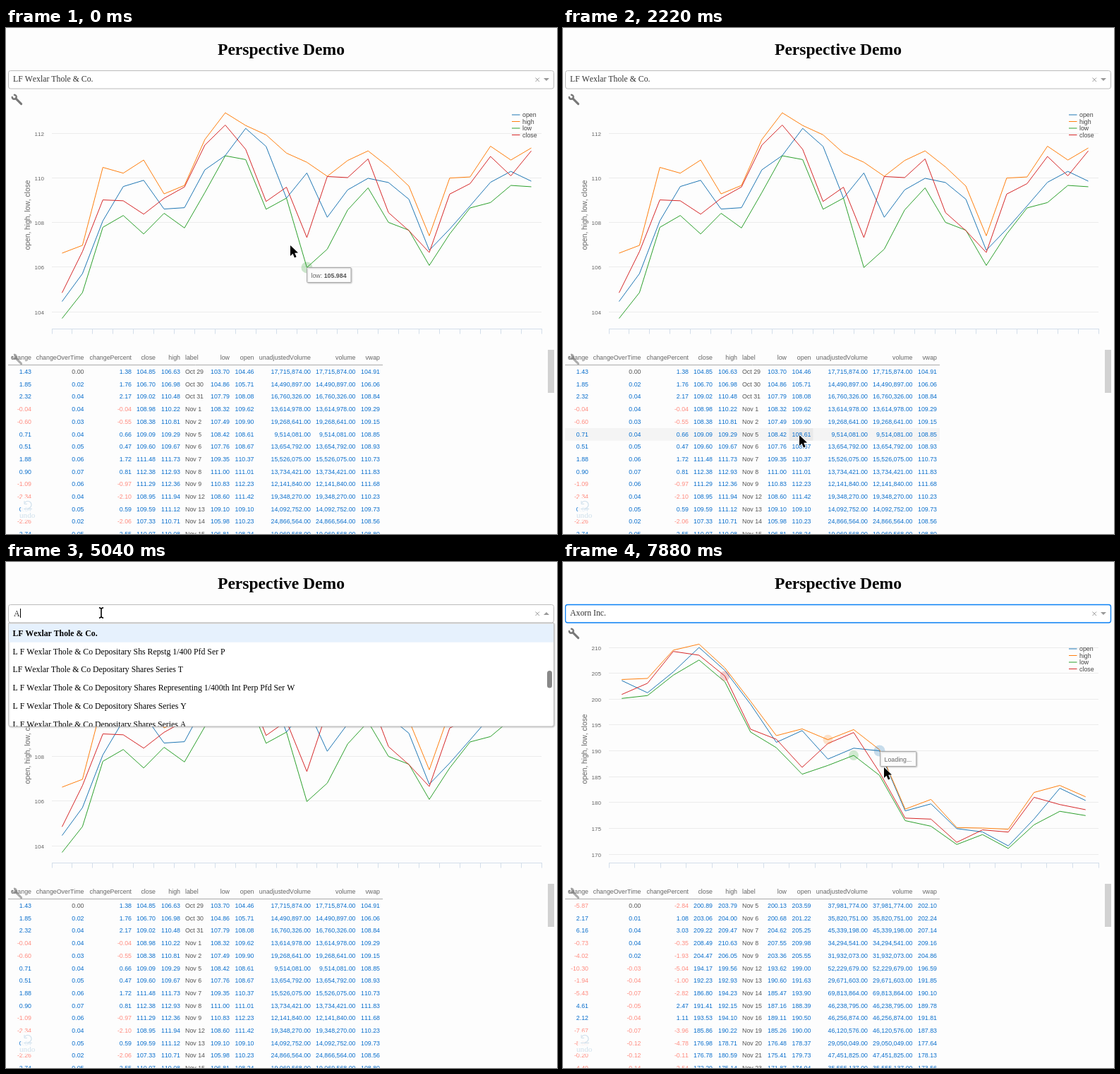
An HTML page with a canvas for the animation above (8000 ms loop, 781 px wide and 717 px high).

```html
<!DOCTYPE html>
<html lang="en">
<head>
<meta charset="utf-8">
<title>Perspective Demo</title>
<style>
  html, body { margin: 0; height: 100%; overflow: hidden; background: #fdfdfd; }
  canvas { display: block; }
</style>
</head>
<body>
<canvas id="stage" width="781" height="717"></canvas>
<script>
const ctx = document.getElementById('stage').getContext('2d');
ctx.fontKerning = 'none';
const LOOP = 8000;
const STEP = 148.6; // the screen repaints once per step; all times below count steps
const LEAD = 15;
const SANS = '"Liberation Sans", Arial, sans-serif';
const SERIF = '"Liberation Serif", Times, serif';
const SERIES = ['open', 'high', 'low', 'close'];
const COLORS = ['#1f77b4', '#ff7f0e', '#2ca02c', '#d62728'];
const [OPEN, HIGH, LOW, CLOSE] = [0, 1, 2, 3];
const AT = { open: 25, scrollbar: 30, type: 33, scroll: 34, filter: 36, blink: 41, choose: 45, reload: 48 };

const noise = i => Math.abs(Math.sin(i * 12.9898) * 43758.5453) % 1;
const list = values => values.trim().split(/\s+/).map(Number);

const bank = {
  name: 'LF Wexlar Thole & Co.', firstDay: 0, previous: 103.42,
  axis: { top: 112, y: 149.5, unit: 31.57, step: 2, count: 5 },
  volume: range => 6050217 + 3981453 * range,
  prices: [
    list(`104.46 105.71 108.08 109.62 109.90 108.61 108.67 110.37 111.01 112.23 111.42 109.10
      110.23 108.24 109.47 109.99 109.80 109.05 106.76 107.71 108.75 109.81 110.30 109.86`),
    list(`106.63 106.98 110.48 110.22 110.81 109.29 109.67 111.73 112.93 112.36 111.94 111.12
      110.71 110.08 110.79 111.22 110.50 109.64 107.41 110 110.05 111.43 110.81 111.35`),
    list(`103.70 104.86 107.79 108.32 107.49 108.42 107.76 109.35 111 110.83 108.60 109.10
      105.984 106.81 108.57 109.56 108.01 107.66 106.08 107.49 108.66 108.90 109.67 109.61`),
    list(`104.85 106.70 109.02 108.98 108.38 109.09 109.60 111.48 112.38 111.29 108.95 109.59
      107.33 110.07 110.02 110.86 108.45 107.64 106.66 109.28 109.75 110.97 110.10 111.22`)
  ]
};

const techOpen = list(`203.59 201.22 205.25 209.98 205.55 199 191.63 193.90 188.39 190.50
  190 178.37 179.73 174.94 174.30 171.60 176.80 182.75 180.38`);
const techClose = list(`200.89 203.06 209.22 208.49 204.47 194.17 192.23 186.80 191.41 193.53
  185.86 176.98 176.78 172.29 174.70 174.27 181 179.60 178.60`);
const tech = {
  name: 'Axorn Inc.', firstDay: 5, previous: 206.76,
  axis: { top: 210, y: 121, unit: 7.325, step: 5, count: 9 },
  volume: range => 15120348 + 6241789 * range,
  prices: [
    techOpen,
    techOpen.map((open, i) => Math.max(open, techClose[i]) + 0.2 + 0.8 * noise(i)),
    techOpen.map((open, i) => Math.min(open, techClose[i]) - 0.4 - 1.2 * noise(i + 50)),
    techClose
  ]
};

// Trading days from Oct 29, 2018, without weekends and Thanksgiving
const DAYS = Array.from({ length: 26 }, (_, i) => new Date(2018, 9, 29 + i))
  .filter(day => day.getDay() % 6 && day.getDate() !== 22)
  .map(day => day.toLocaleDateString('en-US', { month: 'short', day: 'numeric' }));

const OPTIONS = [
  'LFWexlar Disciplined HY',
  'Calbree Preferred and Income Term Fund of Beneficial Interest',
  'LFWexlar Diversified Return International Currency Hedged',
  'LFWexlar Diversified Return International Equity',
  'LFWexlar Long/Short',
  bank.name,
  'L F Wexlar Thole & Co Depositary Shs Repstg 1/400 Pfd Ser P',
  'LF Wexlar Thole & Co Depositary Shares Series T',
  'L F Wexlar Thole & Co Depository Shares Representing 1/400th Int Perp Pfd Ser W',
  'L F Wexlar Thole & Co Depository Shares Series Y',
  'L F Wexlar Thole & Co Depositary Shares Series A'
];
const MATCHES = [tech.name, 'Axorn Hospitality REIT Inc.', 'Maxorne Land & Timber Company Inc.',
  'Saxolby Income Trust', 'Quaxwell Holdings Corp. Class A', 'Braxley Materials Inc.'];

// Pointer stops: step, x, y
const STOPS = [
  [0, 403, 308], [3, 508, 240], [7, 172, 258], [10, 262, 161], [16, 350, 660], [17, 350, 660],
  [19, 344, 578], [20, 344, 578], [25, 135, 72], [39, 135, 72], [42, 88, 96], [51, 88, 96], [53, 455, 291]
];
// Hovered points: step, series, index
const HOVERS = [
  [0, LOW, 12], [3, OPEN, 15], [5, CLOSE, 11], [7, LOW, 3], [8, CLOSE, 4], [9, OPEN, 4], [10, HIGH, 6],
  [52, CLOSE, 4], [52, HIGH, 8], [52, LOW, 9], [53, OPEN, 10]
];

function pointerAt(step) {
  const next = STOPS.findIndex(([at]) => at > step);
  if (next < 0) return STOPS.at(-1).slice(1);
  const [from, x0, y0] = STOPS[next - 1], [to, x1, y1] = STOPS[next];
  const k = (step - from) / (to - from);
  return [x0 + (x1 - x0) * k, y0 + (y1 - y0) * k].map(Math.round);
}

function text(value, x, y, { size = 8.84, font = SANS, color = '#666', align = 'left', weight = '' } = {}) {
  ctx.font = `${weight} ${size}px ${font}`;
  ctx.fillStyle = color;
  ctx.textAlign = align;
  ctx.fillText(value, x, y);
  return ctx.measureText(value).width;
}

function line(points, color, width = 1) {
  ctx.beginPath();
  points.forEach(([x, y]) => ctx.lineTo(x, y));
  ctx.strokeStyle = color;
  ctx.lineWidth = width;
  ctx.stroke();
}

function box(x, y, w, h, fill, stroke, radius = 0, width = 1) {
  ctx.beginPath();
  ctx.roundRect(x, y, w, h, radius);
  if (fill) { ctx.fillStyle = fill; ctx.fill(); }
  if (stroke) { ctx.strokeStyle = stroke; ctx.lineWidth = width; ctx.stroke(); }
}

function raisedBox(...args) {
  ctx.save();
  ctx.shadowColor = 'rgba(0,0,0,.2)';
  ctx.shadowBlur = 2;
  ctx.shadowOffsetX = ctx.shadowOffsetY = 1;
  box(...args);
  ctx.restore();
}

function polygon(points, fill, stroke) {
  if (stroke) line([...points, points[0]], stroke, 1.4);
  ctx.beginPath();
  points.forEach(([x, y]) => ctx.lineTo(x, y));
  ctx.fillStyle = fill;
  ctx.fill();
}

function wrench(x, y, alpha) {
  ctx.save();
  ctx.translate(x, y);
  ctx.rotate(Math.PI / 4);
  ctx.globalAlpha = alpha;
  ctx.lineCap = 'round';
  line([[-3, 0], [8, 0]], '#777', 3);
  ctx.beginPath();
  ctx.arc(-6, 0, 3, -2.3, 2.3);
  ctx.lineWidth = 2.4;
  ctx.stroke();
  ctx.restore();
}

function pointOf(stock, series, index) {
  const { top, y, unit } = stock.axis;
  const prices = stock.prices[series];
  return [65 + 694 / prices.length * (index + 0.5), y + (top - prices[index]) * unit];
}

function drawChart(stock, step) {
  const { axis, prices } = stock;
  for (let i = 0; i < axis.count; i++) {
    const y = Math.floor(axis.y + i * axis.step * axis.unit) + 0.5;
    line([[65, y], [759, y]], '#ececec');
    text(axis.top - i * axis.step, 54, y + 3, { size: 8.1, align: 'right' });
  }
  const days = prices[OPEN].length;
  line([[65, 426.5], [759, 426.5]], '#d3deea');
  for (let i = 0; i <= days; i++) {
    const x = Math.floor(65 + 694 / days * i) + 0.5;
    line([[x, 426], [x, 433.5]], '#d3deea');
  }
  ctx.save();
  ctx.translate(33.5, 265);
  ctx.rotate(-Math.PI / 2);
  text(SERIES.join(', '), 0, 0, { size: 10.3, align: 'center' });
  ctx.restore();

  ctx.lineJoin = 'round';
  SERIES.forEach((name, s) => {
    line(prices[s].map((_, i) => pointOf(stock, s, i)), COLORS[s]);
    const y = 123 + s * 9.5;
    line([[717, y], [728.5, y]], COLORS[s]);
    text(name, 732, y + 3, { color: '#444' });
  });

  // Halos shrink and fade over four steps
  const recent = HOVERS.filter(([at]) => step >= at && step - at < 4);
  for (const [at, series, index] of recent) {
    const age = step - at;
    ctx.globalAlpha = 0.24 - 0.03 * age;
    ctx.beginPath();
    ctx.arc(...pointOf(stock, series, index), 8 - age, 0, 7);
    ctx.fillStyle = COLORS[series];
    ctx.fill();
    ctx.globalAlpha = 1;
  }
  if (recent.length) drawTooltip(stock, recent.at(-1), step);
}

function drawTooltip(stock, [at, series, index], step) {
  const [x, y] = pointOf(stock, series, index).map(v => Math.round(v) + 0.5);
  const loaded = at === 0 || step > at;
  const label = loaded ? SERIES[series] + ': ' : 'Loading...';
  const value = loaded ? stock.prices[series][index].toFixed(3) : '';
  ctx.font = `8.84px ${SANS}`;
  const labelWidth = ctx.measureText(label).width;
  ctx.font = `bold 8.84px ${SANS}`;
  raisedBox(x, y, labelWidth + ctx.measureText(value).width + 12.5, 21, '#fcfcfc', '#aaa', 1);
  text(label, x + 6, y + 14);
  text(value, x + 6 + labelWidth, y + 14, { weight: 'bold', color: '#555' });
}

const ROW = 17.7;
const COLUMNS = [['change', 36], ['changeOverTime', 110.5], ['changePercent', 178], ['close', 212],
  ['high', 247], ['label', 254], ['low', 317], ['open', 351.5], ['unadjustedVolume', 432],
  ['volume', 495.5], ['vwap', 530]];

function cellsOf(stock, row) {
  const [open, high, low, close] = stock.prices.map(values => values[row]);
  const closes = stock.prices[CLOSE];
  const before = row ? closes[row - 1] : stock.previous;
  const volume = Math.round(stock.volume(high - low));
  return {
    open, high, low, close, volume, unadjustedVolume: volume, label: DAYS[stock.firstDay + row],
    change: close - before,
    changeOverTime: close / closes[0] - 1,
    changePercent: (close / before - 1) * 100,
    vwap: (open + high + low + close) / 4
  };
}

function drawTable(stock, [px, py]) {
  wrench(16, 470, 0.6);
  if (py > 478 && px < 534) {
    const top = 478.5 + Math.round((py - 487) / ROW) * ROW;
    const column = COLUMNS.findIndex(([, right]) => px < right + 3);
    const left = COLUMNS[column - 1][1] + 3.5;
    box(3, top, 531, ROW, '#f4f4f4');
    box(left, top, COLUMNS[column][1] + 3 - left, ROW, '#e9e9e9');
  }
  line([[3, 477.5], [534, 477.5]], '#aaa');
  for (const [name, x] of COLUMNS) {
    const align = name === 'label' ? 'left' : 'right';
    text(name, x, 469.5, { align });
    for (let row = 0; row < 14; row++) {
      const cell = cellsOf(stock, row)[name];
      const color = cell < 0 ? '#ff8c80' : cell > 0 ? '#0b6fcc' : '#555';
      const shown = cell.toLocaleString('en-US', { minimumFractionDigits: 2, maximumFractionDigits: 2 });
      text(shown, x, 490 + row * ROW, { color, align });
    }
  }
  box(768, 456, 9, 61, '#d2d2d2');
}

function drawUndo() {
  const color = '#cfe0ec';
  box(21, 666, 21, 31, 'rgba(253,253,253,.88)');
  ctx.beginPath();
  ctx.arc(31, 675.5, 5, -2.7, 1.5);
  ctx.strokeStyle = color;
  ctx.lineWidth = 1.2;
  ctx.stroke();
  line([[26, 670], [26, 674.5], [30, 674.5]], color);
  line([[25, 681.5], [37, 681.5]], color);
  text('undo', 19, 694, { size: 11.2, font: SERIF, color });
}

function drawSelect(step) {
  const isOpen = step >= AT.open && step < AT.choose;
  const chosen = step >= AT.choose;
  const style = { size: 11.79, font: SERIF, color: '#333' };
  box(3.5, 60.5, 773, 25.5, '#fff', chosen ? '#0a80f5' : '#bbb', 3, chosen ? 1.3 : 1);
  line([[750.5, 70.5], [756, 76]], '#999');
  line([[756, 70.5], [750.5, 76]], '#999');
  const tip = isOpen ? -2 : 2;
  polygon([[762, 73 - tip], [770, 73 - tip], [766, 73 + tip]], '#999');

  const letters = step < AT.type ? 0 : step < AT.filter ? 1 : Math.min(step - AT.filter + 2, 5);
  const query = tech.name.slice(0, letters);
  if (!isOpen || !letters) {
    text(chosen ? tech.name : bank.name, 10, 76, { ...style, color: isOpen ? '#4a4a4a' : '#333' });
  }
  if (!isOpen) return;
  const caretX = Math.round(11 + text(query, 11, 77, style)) + 0.5;
  if (step !== AT.scrollbar && step !== AT.blink) line([[caretX, 66], [caretX, 79]], '#000');
  drawOptions(step, query, style);
}

function drawOptions(step, query, style) {
  const filtered = query.length > 1;
  const items = filtered ? MATCHES.filter(name => name.toLowerCase().includes(query.toLowerCase())) : OPTIONS;
  const current = filtered ? tech.name : bank.name;
  const rowHeight = 25.8;
  const height = Math.min(146.5, items.length * rowHeight);
  const scroll = filtered ? 0 : step < AT.scroll ? 7 : 128.5;
  raisedBox(3.5, 86.5, 773, height, '#fff', '#c4c4c4', [0, 0, 3, 3]);
  ctx.save();
  ctx.beginPath();
  ctx.rect(4, 87, 772, height - 0.5);
  ctx.clip();
  items.forEach((name, i) => {
    const top = 87.5 + i * rowHeight - scroll;
    if (name === current) box(4, top, 772, rowHeight, '#e6f1fd');
    text(name, 9.5, top + 16.8, { ...style, color: '#000', weight: name === current ? 'bold' : '' });
  });
  ctx.restore();
  if (step >= AT.scrollbar && !filtered) box(767, 150 + scroll / 32, 7, 24.5, '#888', null, 3.5);
}

function drawPointer([x, y], overInput) {
  if (overInput) {
    for (const [color, width] of [['#fff', 3.2], ['#000', 1.6]]) {
      line([[x, 65.5], [x, 78.5]], color, width);
      line([[x - 3, 64.5], [x, 66], [x + 3, 64.5]], color, width);
      line([[x - 3, 79.5], [x, 78], [x + 3, 79.5]], color, width);
    }
    return;
  }
  const arrow = [[0, 0], [0, 15], [3.5, 11.8], [6, 17.5], [8.6, 16.3], [6.2, 10.8], [11, 10.6]];
  polygon(arrow.map(([dx, dy]) => [x + dx, y + dy]), '#000', '#fff');
}

function frame(now) {
  const step = Math.floor((now % LOOP + LEAD) / STEP);
  const pointer = pointerAt(step);
  const stock = step < AT.reload ? bank : tech;
  box(0, 0, 781, 717, '#fdfdfd');
  text('Perspective Demo', 390, 38, { size: 23.58, font: SERIF, color: '#000', align: 'center', weight: 'bold' });
  wrench(16, 102, 1);
  drawChart(stock, step);
  drawTable(stock, pointer);
  drawUndo();
  drawSelect(step);
  drawPointer(pointer, pointer[1] > 60 && pointer[1] < 80);
  requestAnimationFrame(frame);
}
requestAnimationFrame(frame);
</script>
</body>
</html>
```
